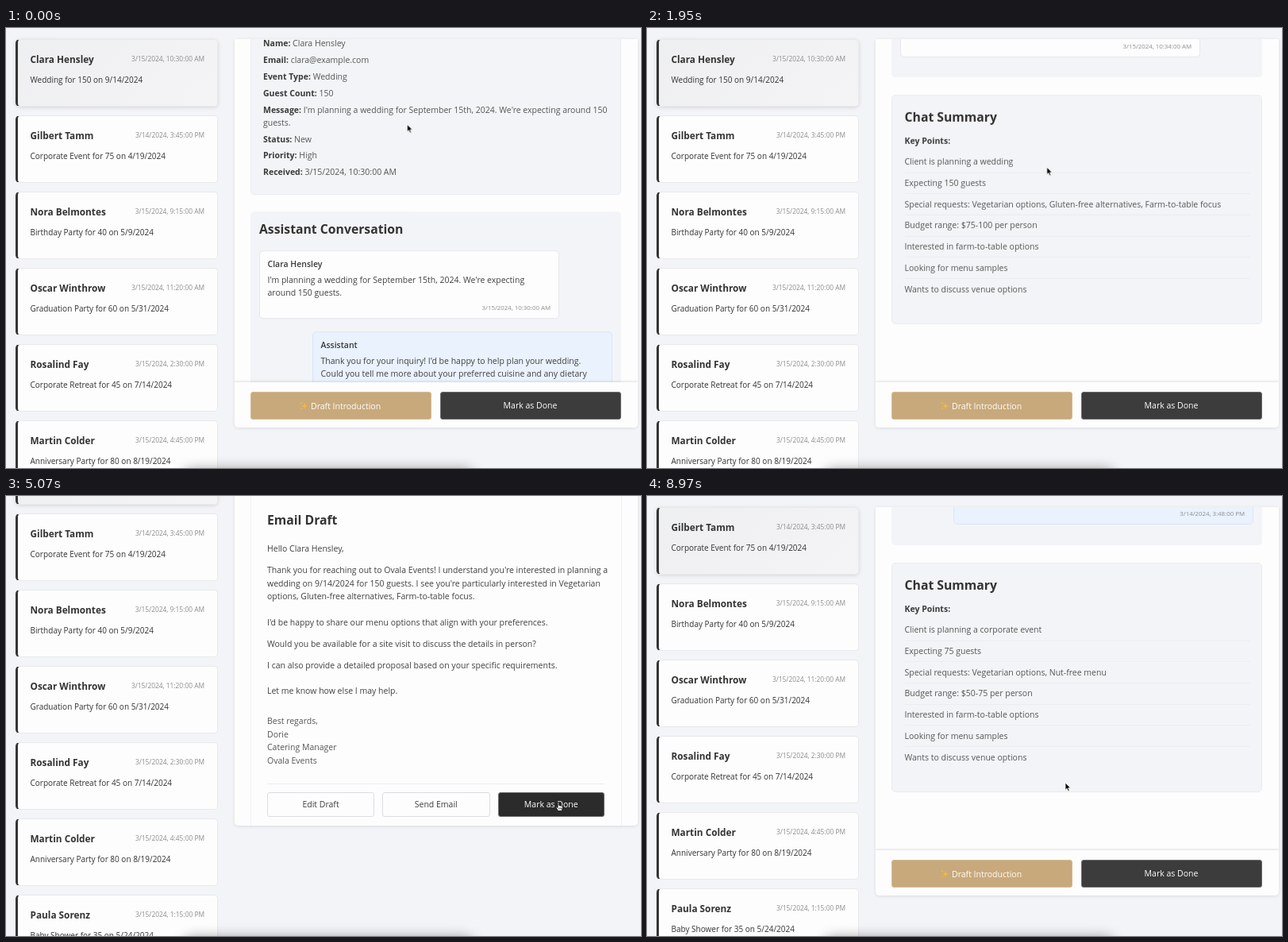
An HTML page that plays this animation: 800 px wide and 554 px high, repeating every 9 s.

```html
<!DOCTYPE html>
<html lang="en">
<head>
<meta charset="utf-8">
<title>Event inquiries</title>
<style>
html, body { margin: 0; width: 100%; height: 100%; overflow: hidden; }
body { font: 10.5px/20px "Open Sans", sans-serif; color: #555; }
#stage { position: relative; width: 800px; height: 554px; overflow: hidden; background: #f3f4f7; }
#stage div, p, svg { position: absolute; box-sizing: border-box; }
p { margin: -10px 0 0; white-space: nowrap; }
b { font-weight: 700; color: #3a3a3a; }
.layer { left: 0; top: 0; width: 800px; height: 554px; }

.mid { transform: translateX(-50%); }
.end { transform: translateX(-100%); }
.h { font-size: 15.75px; font-weight: 700; color: #333; }
.name { font-size: 11.8px; font-weight: 700; color: #333; }
.desc { font-size: 10px; color: #333; }
.time { font-size: 8.4px; color: #8c8c8c; }
.stamp { font-size: 7.87px; color: #8c8c8c; }
.who { font-weight: 600; color: #3a3a3a; }
.msg, .mail, .dark { color: #404040; }
.label { font-weight: 500; color: #333; }
.light { color: #fff; }
.native { font-family: "Liberation Sans", Arial, sans-serif; color: #222; }
.cross { font-size: 15.75px; color: #444; }

.card { background: #fdfdfd; border: 1px solid #e8e9ed; border-left: 3px solid #353535; border-radius: 5px; }
.card.on { background: linear-gradient(135deg, #eeeff1, #f4f4f6); box-shadow: 0 1px 5px rgba(0,0,0,.13); }
.panel, .shade { left: 288px; top: 14px; width: 507.5px; height: 489px; border-radius: 0 0 5px 5px; }
.panel { overflow: hidden; background: #fdfdfd; }
.shade { box-shadow: 0 1px 4px rgba(0,0,0,.1); }
.inner { left: -288px; top: -14px; width: 800px; height: 1700px; }
.box { background: #f3f4f7; border-radius: 5px; }
.edge { border: 1px solid #e9ebef; }
.sheet { border: 1px solid #f0f1f4; }
.client, .helper { border: 1px solid #e6e8ec; border-radius: 5px; background: #fdfdfd; }
.helper { border-color: #dae7f6; background: #e9f2fd; }
.rule { height: 1px; background: #ebedf0; }
.bar { background: #fdfdfd; box-shadow: 0 -1px 3px rgba(0,0,0,.12); }
.btn { border-radius: 3px; background: #fdfdfd; border: 1px solid #dcdde0; }
.btn.solid { background: #3c3c3c; border-color: #6e6e6e; }
.btn.gold { background: #c8a97b; border-color: #d3bb95; }
.modal { background: #fcfcfd; border-radius: 4px; box-shadow: 0 2px 6px rgba(0,0,0,.15); }
.field { background: #fdfdfd; border: 1px solid #d4d5d9; border-radius: 3px; }
.dock { left: 225px; top: 558px; width: 362px; height: 20px; border-radius: 10px; box-shadow: 0 0 16px 2px rgba(0,0,0,.42); }

/* 1% = 90 ms */
#now, #now *, #next, #cursor, #cursor * { animation: 9s infinite both; }
#now .page { animation-name: page; }
#now .scroll { animation-name: scroll; }
#now .bar { animation-name: bar; }
#now .draft { animation-name: draft; }
#now .gold { animation-name: gold; }
#now .done { animation-name: done; }
#now .dialog { animation-name: dialog; }
#now .select { animation-name: select; }
#now .close { animation-name: close; }
#next { animation-name: next; }
#cursor { left: 0; top: 0; animation-name: move; }
#arrow { animation-name: arrow; }
#hand { animation-name: hand; }

@keyframes page {
  0%, 41.67% { transform: none; animation-timing-function: ease-in-out; }
  46.4%, 100% { transform: translateY(-88px); }
}
@keyframes scroll {
  0% { transform: none; animation-timing-function: cubic-bezier(.333,.667,.667,1); }
  20%, 41.67% { transform: translateY(-770px); animation-timing-function: ease-in-out; }
  46.4%, 52.67% { transform: translateY(-1079px); animation-timing-function: ease-in-out; }
  56%, 100% { transform: translateY(-1075px); }
}
@keyframes bar { 0%, 41.6% { opacity: 1; } 41.67%, 100% { opacity: 0; } }
@keyframes draft { 0%, 41.6% { opacity: 0; } 41.67%, 100% { opacity: 1; } }
@keyframes gold {
  0%, 36.8% { background: #c8a97b; }
  38.5%, 100% { background: #b8996a; }
}
@keyframes done {
  0%, 55% { background: #3c3c3c; box-shadow: none; }
  56.5%, 69% { background: #2b2b2b; box-shadow: none; }
  69.1%, 72% { background: #3a2d35; box-shadow: 0 0 0 1px #93508a; }
  72.1%, 100% { background: #3c3c3c; box-shadow: none; }
}
@keyframes dialog { 0%, 69.3% { opacity: 0; } 70%, 100% { opacity: 1; } }
@keyframes select {
  0%, 77.9% { border-color: #d4d5d9; box-shadow: none; }
  78%, 100% { border-color: #707070; box-shadow: 0 0 0 1px #b4b4b4; }
}
@keyframes close { 0%, 95.4% { background: #3c3c3c; } 96.5%, 100% { background: #2b2b2b; } }
@keyframes next { 0%, 98.3% { opacity: 0; } 98.34%, 100% { opacity: 1; } }
@keyframes move {
  0%, 17% { transform: translate(505.5px, 121.5px); animation-timing-function: ease-in; }
  21% { transform: translate(505px, 164px); animation-timing-function: linear; }
  31% { transform: translate(486px, 330px); animation-timing-function: ease-out; }
  38%, 41.67% { transform: translate(416px, 481px); animation-timing-function: ease-in-out; }
  46%, 52.67% { transform: translate(428px, 472px); animation-timing-function: ease-in-out; }
  56%, 71.2% { transform: translate(696px, 385px); animation-timing-function: ease-in-out; }
  77%, 79% { transform: translate(400px, 252px); animation-timing-function: ease-in-out; }
  88%, 89.5% { transform: translate(276px, 292px); animation-timing-function: ease-in-out; }
  91.2%, 92.5% { transform: translate(262px, 291px); animation-timing-function: ease-in-out; }
  96.8%, 100% { transform: translate(527px, 361px); }
}
@keyframes hand {
  0%, 36.9%, 42%, 55.2%, 72%, 95.5%, 98.34%, 100% { opacity: 0; animation-timing-function: step-end; }
  37%, 55.3%, 95.6% { opacity: 1; animation-timing-function: step-end; }
}
@keyframes arrow {
  0%, 36.9%, 42%, 55.2%, 72%, 95.5%, 98.34%, 100% { opacity: 1; animation-timing-function: step-end; }
  37%, 55.3%, 95.6% { opacity: 0; animation-timing-function: step-end; }
}
</style>
</head>
<body>
<div id="stage"></div>
<script>
const text = (x, y, s, cls = '') => `<p class="${cls}" style="left:${x}px;top:${y}px">${s}</p>`;
const rect = (x, y, w, h, cls, inside = '') =>
  `<div class="${cls}" style="left:${x}px;top:${y}px;width:${w}px;height:${h}px">${inside}</div>`;
const lines = (x, y, step, list, cls) => list.map((s, i) => text(x, y + i * step, s, cls)).join('');
const button = (x, y, w, h, s, cls = '') =>
  rect(x, y, w, h, 'btn ' + cls) + text(x + w / 2, y + h / 2, s, 'mid ' + (cls ? 'light' : 'dark'));

const inquiries = [
  ['Clara Hensley', '3/15/2024, 10:30:00 AM', 'Wedding for 150 on 9/14/2024'],
  ['Gilbert Tamm', '3/14/2024, 3:45:00 PM', 'Corporate Event for 75 on 4/19/2024'],
  ['Nora Belmontes', '3/15/2024, 9:15:00 AM', 'Birthday Party for 40 on 5/9/2024'],
  ['Oscar Winthrow', '3/15/2024, 11:20:00 AM', 'Graduation Party for 60 on 5/31/2024'],
  ['Rosalind Fay', '3/15/2024, 2:30:00 PM', 'Corporate Retreat for 45 on 7/14/2024'],
  ['Martin Colder', '3/15/2024, 4:45:00 PM', 'Anniversary Party for 80 on 8/19/2024'],
  ['Paula Sorenz', '3/15/2024, 1:15:00 PM', 'Baby Shower for 35 on 5/24/2024']
];
const client = inquiries[0][0];

const sidebar = list => list.map(([name, time, desc], i) => {
  const y = 14 + i * 96;
  return rect(12, y, 255, 85, i ? 'card' : 'card on') + text(30.5, y + 25, name, 'name') +
    text(250, y + 24.5, time, 'time end') + text(30.5, y + 51, desc, 'desc');
}).join('');

const message = (y, who, body, time) => {
  const helper = who === 'Assistant', x = helper ? 386 : 319, h = 54 + body.length * 16;
  return rect(x, y, 378, h, helper ? 'helper' : 'client') + text(x + 10.5, y + 16.5, who, 'who') +
    lines(x + 10.5, y + 37, 15.8, body, 'msg') + text(x + 367, y + h - 14, time, 'stamp end');
};

const summary = (y, points) => rect(308, y, 467, 289, 'box edge') +
  text(324.5, y + 28, 'Chat Summary', 'h') + text(324.5, y + 58, '<b>Key Points:</b>') +
  lines(324.5, y + 84.3, 26.7, points) +
  points.slice(1).map((_, i) => rect(324.5, y + 97.5 + i * 26.7, 435, 1, 'rule')).join('');

const star = (x, y, r) => `<path d="M${x} ${y - r}l${r / 4} ${r * .75} ${r * .75} ${r / 4} ${-r * .75} ${r / 4}
  ${-r / 4} ${r * .75} ${-r / 4} ${-r * .75} ${-r * .75} ${-r / 4} ${r * .75} ${-r / 4}Z"/>`;
const sparkle = `<svg style="left:370px;top:470px" width="11" height="11" fill="#f4b942">
  ${star(6, 6, 4.2)}${star(2, 2.2, 1.9)}${star(2, 9, 1.6)}</svg>`;
const actions = rect(288, 446, 508, 58, 'bar', `<div style="left:-288px;top:-446px">
  ${rect(308, 457.5, 228, 35.5, 'btn gold')}${sparkle}${text(384, 475.5, 'Draft Introduction', 'light')}
  ${button(546.5, 457.5, 228, 35.5, 'Mark as Done', 'solid')}</div>`);

const panel = content => `<div class="shade"></div><div class="panel"><div class="inner">
  <div class="scroll layer">${content}</div>${actions}</div></div>`;

const field = (k, v) => `<b>${k}:</b> ${v}`;
const details = rect(308, -60, 467, 271, 'box edge') +
  lines(324, 20.3, 20.9, [field('Name', client), field('Email', 'clara@example.com'),
    field('Event Type', 'Wedding'), field('Guest Count', 150),
    field('Message', "I'm planning a wedding for September 15th, 2024. We're expecting around 150")]) +
  text(324, 119.6, 'guests.') +
  lines(324, 140.5, 20.9, [field('Status', 'New'), field('Priority', 'High'), field('Received', inquiries[0][1])]);

const chat = rect(308, 232, 467, 600, 'box') + text(319, 254, 'Assistant Conversation', 'h') +
  message(281, client, ["I'm planning a wedding for September 15th, 2024. We're expecting", 'around 150 guests.'], '3/15/2024, 10:30:00 AM') +
  message(383, 'Assistant', ["Thank you for your inquiry! I'd be happy to help plan your wedding.",
    'Could you tell me more about your preferred cuisine and any dietary', 'requirements?'], '3/15/2024, 10:31:00 AM') +
  message(501, client, ["We'd love a farm-to-table menu with vegetarian options and some", 'gluten-free alternatives.'], '3/15/2024, 10:32:00 AM') +
  message(603, 'Assistant', ['That sounds wonderful! We specialize in farm-to-table cuisine and can',
    'accommodate those dietary requirements. Our standard package starts',
    'at $75 per person. Would you like to hear more about our menu options?'], '3/15/2024, 10:33:00 AM') +
  message(721, client, ["Yes, please! We're particularly interested in local, seasonal ingredients.",
    'Our budget is around $100 per person.'], '3/15/2024, 10:34:00 AM');

const common = ['Interested in farm-to-table options', 'Looking for menu samples', 'Wants to discuss venue options'];
const points = ['Client is planning a wedding', 'Expecting 150 guests',
  'Special requests: Vegetarian options, Gluten-free alternatives, Farm-to-table focus',
  'Budget range: $75-100 per person', ...common];
const nextPoints = ['Client is planning a corporate event', 'Expecting 75 guests',
  'Special requests: Vegetarian options, Nut-free menu', 'Budget range: $50-75 per person', ...common];

const mail = (y, ...list) => lines(329, y, 16.8, list, 'mail');
const draft = rect(0, 1167, 800, 440, 'draft',
  rect(308, -12, 467.5, 450, 'sheet') + text(329, 26, 'Email Draft', 'h') +
  mail(61.8, `Hello ${client},`) +
  mail(88.8, "Thank you for reaching out to Ovala Events! I understand you're interested in planning a",
    "wedding on 9/14/2024 for 150 guests. I see you're particularly interested in Vegetarian",
    'options, Gluten-free alternatives, Farm-to-table focus.') +
  mail(154.7, "I'd be happy to share our menu options that align with your preferences.") +
  mail(181.8, 'Would you be available for a site visit to discuss the details in person?') +
  mail(208.9, 'I can also provide a detailed proposal based on your specific requirements.') +
  mail(241, 'Let me know how else I may help.') +
  lines(329, 279, 16.6, ['Best regards,', 'Dorie', 'Catering Manager', 'Ovala Events']) +
  rect(329, 357.5, 425, 1, 'rule') +
  button(329, 368.5, 135, 31.5, 'Edit Draft') + button(474, 368.5, 135.5, 31.5, 'Send Email') +
  button(619.5, 368.5, 134.5, 31.5, 'Mark as Done', 'solid done'));

const dialog = `<div class="dialog layer" style="background:rgba(0,0,0,.52)">` +
  rect(241, 97, 326, 297, 'modal') + rect(241, 159.5, 326, 1, 'rule') + rect(241, 330.5, 326, 1, 'rule') +
  text(256.5, 128.5, 'Close Inquiry', 'h') + text(541.5, 128.5, '×', 'cross mid') +
  text(256.5, 194.5, `Closing inquiry for ${client}`) + text(256.5, 226, 'Status', 'label') +
  rect(256, 238, 295.5, 30.5, 'field select') + text(267, 253.5, 'Responded (waiting on client)', 'native') +
  `<svg style="left:542px;top:251px" width="8" height="6" fill="none" stroke="#444"><path d="M1.5 1.5 4 4 6.5 1.5"/></svg>` +
  rect(256.5, 287, 10.5, 10.5, 'field') + text(272.3, 292.5, 'Response was sent', 'dark') +
  button(379.5, 347.5, 65.5, 31, 'Cancel') + button(455, 347.5, 96.5, 31, 'Close Inquiry', 'solid close') + '</div>';

const nextChat = rect(308, -40, 467, 102, 'box') +
  message(-66, 'Assistant', ['', '', ''], '3/14/2024, 3:48:00 PM') + summary(84, nextPoints);

document.getElementById('stage').innerHTML = `
  <div id="now" class="layer">
    <div class="page layer">${sidebar(inquiries)}${panel(details + chat + summary(854, points) + draft)}</div>
    ${dialog}
  </div>
  <div id="next" class="layer" style="background:#f3f4f7">${sidebar(inquiries.slice(1))}${panel(nextChat)}</div>
  <div class="dock"></div>
  <div id="cursor">
    <svg id="arrow" style="left:-1px;top:-1px" width="10" height="14" viewBox="-1 -1 10 14">
      <path d="M0 0V9.2L2.1 7.3 3.6 10.8 5.2 10.1 3.7 6.7H6.6Z" fill="#000" stroke="#fff" stroke-width=".8"/></svg>
    <svg id="hand" style="left:-5px;top:-1px" width="13" height="14" viewBox="-1 -1 13 14" stroke="#111" stroke-linejoin="round">
      <path d="M3 6.500V1.200a.9.9 0 0 1 1.800 0V4.500L8.300 5.200Q9.500 5.500 9.400 6.700L8.800 9.700Q8.600 11.500 7.600 11.500H4.300Q3.500 11.500 2.900 10.400L.6 7Q1.300 5.800 3 7.500Z" fill="#fff"/>
      <path d="M4.600 7.500V9.500M6.100 7.500V9.500M7.500 7.500V9.500" stroke-width=".7"/></svg>
  </div>`;
</script>
</body>
</html>
```
